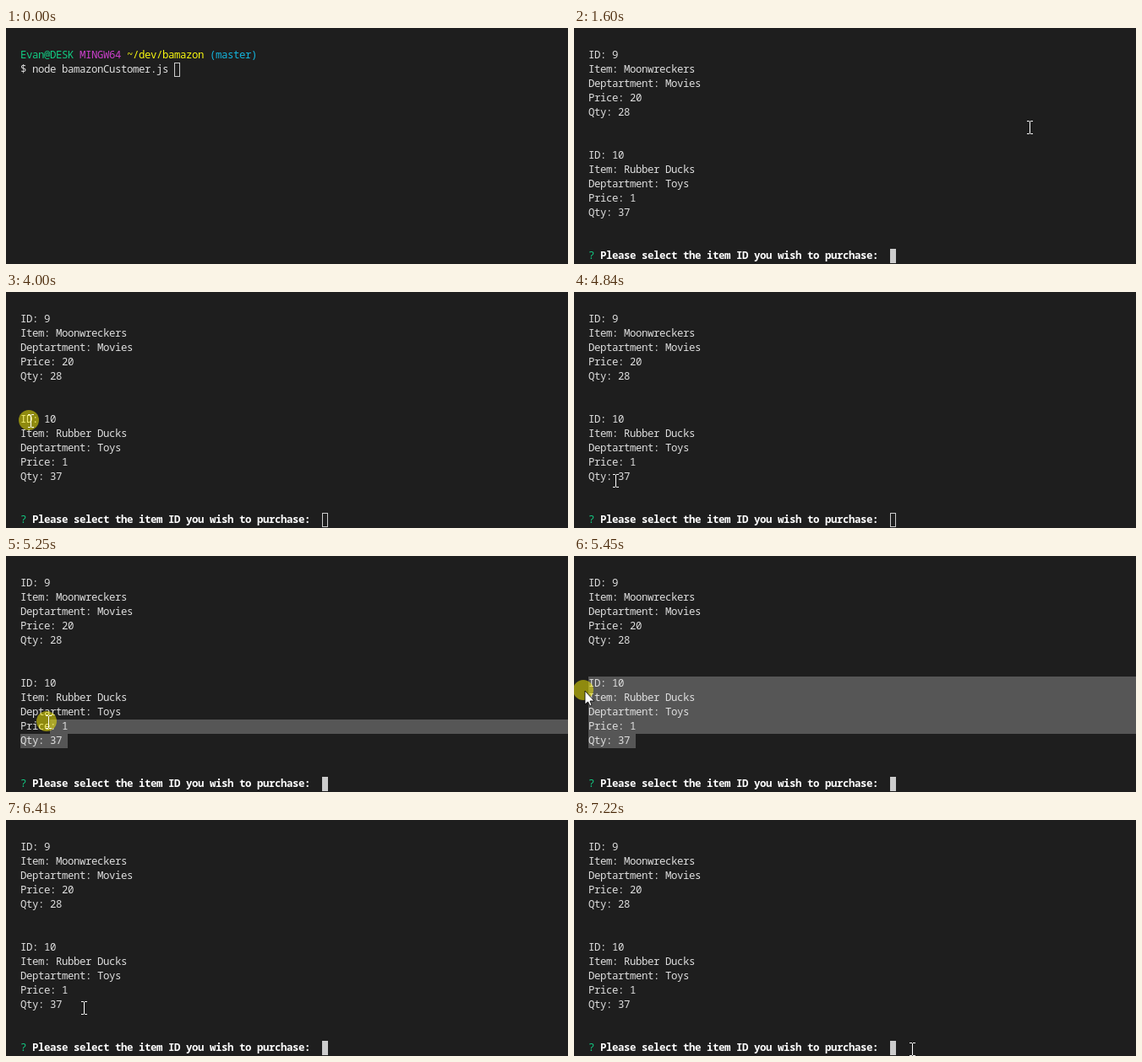
Recreate the animation shown at these times as an HTML page with a canvas. Size 665 px wide and 280 px high, loop 8000 ms.

```html
<!DOCTYPE html>
<html lang="en">
<head>
<meta charset="utf-8">
<title>Terminal store</title>
<style>
  html, body { margin: 0; width: 100%; height: 100%; overflow: hidden; background: #1e1e1e; }
  canvas { display: block; }
</style>
</head>
<body>
<canvas id="stage" width="665" height="280"></canvas>
<script>
const ctx = document.getElementById('stage').getContext('2d');
const W = 665, H = 280, LOOP = 8000;
const LEFT = 17, TOP = 24, CELL = 7, ROW = 17;
const FONT = '12.4px "Noto Sans Mono", "DejaVu Sans Mono", monospace';
const C = {
  bg: '#1e1e1e', text: '#dedede', bold: '#ffffff', green: '#12cb83',
  magenta: '#cc40cc', yellow: '#f8f810', cyan: '#14b4dc',
  caret: '#cccccc', select: '#565656', click: 'rgba(255, 245, 0, 0.5)'
};

const T = { focus: 580, enter: 1290, list: 1600, blur: 3920, drag: 5060, drop: 5580, clear: 6280 };
const presses = [[T.focus, 680], [T.blur, 4710], [T.drag, T.drop], [T.clear, 6370]];
const anchor = { col: 8, row: 11 };

// Pointer moves: begin, end, x, y, optional sag; it rests in between
const moves = [
  [70, 70, 588, 235],
  [70, 300, 539, 118],
  [2950, 3740, 16, 146, 75],
  [T.blur, 4000, 29, 153],
  [4050, 4560, 67, 221],
  [4740, 4840, 49, 224],
  [4940, 5040, 74, 221],
  [5100, 5450, 13, 160],
  [5480, 5530, 2, 139],
  [T.drop, T.drop, -60, 140],
  [5810, 5810, 2, 140],
  [5810, 6190, 79, 222],
  [6370, 6610, 252, 237],
  [6660, 7220, 400, 272]
];

const ease = k => k * k * (3 - 2 * k);

function pointerAt(t) {
  let x = -60, y = 235;
  for (const [begin, end, toX, toY, sag = 0] of moves) {
    if (t < begin) break;
    const k = t >= end ? 1 : ease((t - begin) / (end - begin));
    x += (toX - x) * k;
    y += (toY - y) * k + sag * Math.sin(Math.PI * k);
  }
  return { x: Math.round(x), y: Math.round(y) };
}

const colX = col => LEFT + col * CELL;
const rowY = row => TOP + row * ROW;

// Each character sits in its own terminal cell
function write(col, row, text, color = C.text, weight = 500) {
  ctx.font = weight + ' ' + FONT;
  ctx.letterSpacing = '0px';
  ctx.letterSpacing = CELL - ctx.measureText('0').width + 'px';
  ctx.fillStyle = color;
  ctx.fillText(text, colX(col), rowY(row) + 12);
}

function drawPrompt() {
  write(0, 0, 'Evan@DESK', C.green);
  write(10, 0, 'MINGW64', C.magenta);
  write(18, 0, '~/dev/bamazon', C.yellow);
  write(32, 0, '(master)', C.cyan);
  write(0, 1, '$ node bamazonCustomer.js');
}

function drawItem(row, id, name, dept, price, qty) {
  ['ID: ' + id, 'Item: ' + name, 'Deptartment: ' + dept, 'Price: ' + price, 'Qty: ' + qty]
    .forEach((line, i) => write(0, row + i, line));
}

function drawList() {
  drawItem(0, 9, 'Moonwreckers', 'Movies', 20, 28);
  drawItem(7, 10, 'Rubber Ducks', 'Toys', 1, 37);
  write(0, 14, '?', C.green);
  write(2, 14, 'Please select the item ID you wish to purchase:', C.bold, 700);
}

function drawCaret(col, row, filled) {
  const x = colX(col), y = rowY(row);
  ctx.fillStyle = ctx.strokeStyle = C.caret;
  ctx.lineWidth = 1;
  if (filled) ctx.fillRect(x, y, CELL, ROW);
  else ctx.strokeRect(x + 0.5, y + 0.5, CELL - 1, ROW - 1);
}

function drawSelection(t) {
  if (t < T.drag || t >= T.clear) return;
  const p = pointerAt(Math.min(t, T.drop - 1));
  const col = Math.max(0, Math.round((p.x - LEFT) / CELL));
  const row = Math.min(anchor.row, Math.floor((p.y - 1 - TOP) / ROW));
  ctx.fillStyle = C.select;
  for (let r = row; r <= anchor.row; r++) {
    const from = colX(r === row ? col : 0);
    const to = r === anchor.row ? colX(anchor.col) : W;
    ctx.fillRect(from, rowY(r), to - from, ROW);
  }
}

function drawBeam(x, y) {
  ctx.fillStyle = '#fff';
  for (const end of [y - 8, y + 7]) {
    ctx.fillRect(x - 3, end, 3, 1);
    ctx.fillRect(x + 1, end, 3, 1);
  }
  ctx.fillRect(x, y - 7, 1, 14);
}

const arrow = new Path2D('M0 0V16L3.5 13L6 18L8 17L6 12H11Z');

function drawArrow(x, y) {
  ctx.save();
  ctx.translate(x, y);
  ctx.fillStyle = '#fff';
  ctx.strokeStyle = '#000';
  ctx.lineWidth = 0.8;
  ctx.fill(arrow);
  ctx.stroke(arrow);
  ctx.restore();
}

function drawPointer(t) {
  const { x, y } = pointerAt(t);
  if (presses.some(([from, to]) => t >= from && t < to)) {
    ctx.fillStyle = C.click;
    ctx.beginPath();
    ctx.arc(x - 2, y - 1, 12, 0, Math.PI * 2);
    ctx.fill();
  }
  if (x < LEFT) drawArrow(x, y);
  else drawBeam(x, y);
}

function draw(t) {
  ctx.fillStyle = C.bg;
  ctx.fillRect(0, 0, W, H);
  if (t < T.list) {
    drawPrompt();
    if (t < T.enter) drawCaret(26, 1, t >= T.focus);
    else drawCaret(0, 2, true);
  } else {
    drawSelection(t);
    drawList();
    drawCaret(51, 14, t < T.blur || t >= T.drag);
  }
  drawPointer(t);
}

const start = performance.now();
function tick() {
  draw((performance.now() - start) % LOOP);
  requestAnimationFrame(tick);
}
tick();
</script>
</body>
</html>
```
